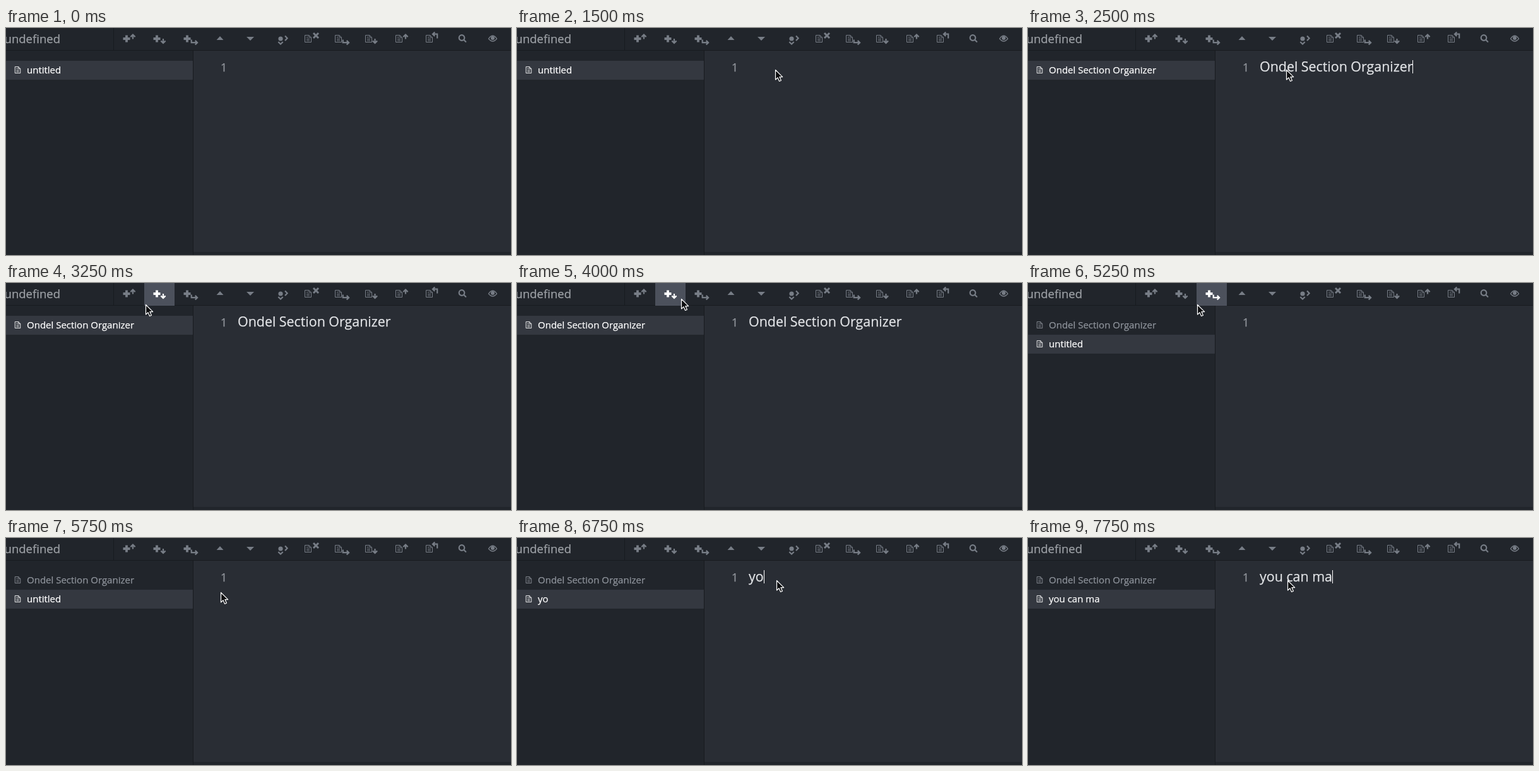
Write an HTML page that moves like this. It is 800x360 px and loops after 8 s.

```html
<!DOCTYPE html>
<html lang="en">
<head>
<meta charset="utf-8">
<title>Outline editor</title>
<style>
  html, body { margin: 0; width: 100%; height: 100%; overflow: hidden; background: #292d34; }
  svg { display: block; }
  text {
    font-family: "Open Sans", "Noto Sans", sans-serif; white-space: pre;
    fill: currentColor; stroke: currentColor; stroke-width: .25;
  }
  .button { color: #777d86; }
  .button rect { fill: none; }
  .button.hover { color: #fff; }
  .button.hover rect { fill: #4c515c; }
  .line { fill: none; stroke: currentColor; stroke-width: 2.2; }
  .bold { stroke-width: 3; }
  .row { color: #8e939b; font-size: 15px; }
  .row.selected { color: #fff; }
</style>
</head>
<body>
<svg width="800" height="360" viewBox="0 0 800 360">
  <defs>
    <path id="plus" d="M-5.5 0H5.5M0-5.5V5.5" fill="none" stroke="currentColor" stroke-width="3.8"/>
    <path id="up" class="line" d="M0 4V-2.5M-3.6 .6 0-3 3.6 .6"/>
    <path id="down" class="line" d="M0-4V2.5M-3.6-.6 0 3 3.6-.6"/>
    <path id="into" class="line" d="M-4.8-4V.7H4M1.2-2.6 4.6 .7 1.2 4"/>
    <path id="out" class="line" d="M3.7 5V-1.8H-3M-.2-5-3.6-1.8-.2 1.4"/>
    <path id="cross" class="line bold" d="M-4-4 4 4M4-4-4 4"/>
    <g id="file" fill="none" stroke="currentColor">
      <path d="M-5-5.5H1.5L5-2V5.5H-5ZM1.5-5.5V-2H5"/>
      <path d="M-2.5-2.5H0M-2.5 .5H2.5M-2.5 3H2.5"/>
    </g>
  </defs>

  <path fill="#292d34" d="M0 0H800V360H0Z"/>
  <path fill="#21252b" d="M0 0H800V36H0ZM0 36H296V360H0ZM297 355H800V360H297Z"/>
  <path fill="#181b1f" d="M0 35H800V36H0ZM170 0H171V35H170ZM296 36H297V360H296Z"/>
  <text x="86" y="24" text-anchor="end" font-size="18.5" color="#9da1a6">undefined</text>

  <g id="toolbar">
    <g><use href="#plus" x="-4" y="17"/><use href="#up" x="6" y="13.5"/></g>
    <g><use href="#plus" x="-4" y="17"/><use href="#down" x="6" y="21"/></g>
    <g><use href="#plus" x="-4" y="17"/><use href="#into" x="7.5" y="22.5"/></g>
    <g><path fill="currentColor" d="M-5.5 19 0 13 5.5 19Z"/></g>
    <g><path fill="currentColor" d="M-6 14H6L0 20Z"/></g>
    <g>
      <circle cy="17" r="3.6" fill="currentColor"/>
      <path class="line" d="M7 12.5 10.6 16.2 7 20M-3.7 22 0 25.5 3.7 22"/>
    </g>
    <g><use href="#file" x="-4.5" y="17"/><use href="#cross" x="8" y="12"/></g>
    <g><use href="#file" x="-4.5" y="17"/><use href="#into" x="7.5" y="22.5"/></g>
    <g><use href="#file" x="-4.5" y="17"/><use href="#down" x="5.5" y="21"/></g>
    <g><use href="#file" x="-4.5" y="17"/><use href="#up" x="6" y="13.5"/></g>
    <g><use href="#file" x="-4.5" y="17"/><use href="#out" x="4.5" y="11.5"/></g>
    <g><circle class="line" cx="-1" cy="15.5" r="4.3"/><path class="line" stroke-linecap="round" d="M2.2 18.7 5.3 21.8"/></g>
    <g>
      <path d="M-6.5 17Q0 7.5 6.5 17Q0 25 -6.5 17Z" fill="none" stroke="currentColor" stroke-width="1.3"/>
      <circle cy="16" r="3" fill="currentColor"/>
    </g>
  </g>

  <rect id="highlight" y="52" width="296" height="30" fill="#343840"/>
  <g class="row"><use href="#file" transform="translate(18.5 66.5) scale(.85 .92)"/><text x="33" y="72"></text></g>
  <g class="row"><use href="#file" transform="translate(18.5 96.5) scale(.85 .92)"/><text x="33" y="102"></text></g>

  <text x="345" y="69" text-anchor="middle" font-size="17.5" color="#92969c">1</text>
  <text id="editor" x="367" y="69" font-size="21.4" color="#e2e4e7"></text>
  <rect id="caret" y="51" width="1" height="21" fill="#fff"/>
  <path id="pointer" d="M.5 .5V16L4 12.7 6.6 18.5 9.4 17.3 6.9 11.6H11.7Z"
        fill="#0c0d0f" stroke="#fff" stroke-width="1.2" stroke-linejoin="round"/>
</svg>
<script>
  const LOOP = 8000, TICK = 250, PITCH = 48;
  const NAME = "Ondel Section Organizer";
  const SVG = "http://www.w3.org/2000/svg";
  const $ = id => document.getElementById(id);

  // Each entry is [time, value] and holds until the next one.
  const pointerTrack = [
    [0, null], [250, [517, 1]], [500, [452, 38]], [750, [423, 54]], [1000, [416, 58]],
    [1500, [409, 66]], [3000, [268, 52]], [3250, [221, 34]], [3500, [234, 27]],
    [3750, [250, 24]], [4000, [260, 25]], [4500, [257, 23]], [4750, [260, 25]],
    [5000, [264, 30]], [5250, [268, 34]], [5500, [291, 60]], [5750, [340, 86]],
    [6000, [386, 80]], [6250, [408, 70]], [6500, [411, 67]]
  ];
  const editorTrack = [
    [0, ""], [2250, NAME], [4250, ""], [6750, "yo"], [7000, "you"],
    [7250, "you c"], [7500, "you can"], [7750, "you can ma"]
  ];
  const titleTrack = [[0, "untitled"], [2500, NAME]];
  const caretTrack = [[0, false], [1750, true], [3000, false], [6500, true]];
  const at = (track, time) => track.findLast(([start]) => start <= time)[1];

  const buttons = [...$("toolbar").children];
  buttons.forEach((button, i) => {
    const back = document.createElementNS(SVG, "rect");
    back.setAttribute("x", -PITCH / 2);
    back.setAttribute("width", PITCH);
    back.setAttribute("height", 36);
    button.prepend(back);
    button.setAttribute("class", "button");
    button.setAttribute("transform", `translate(${195 + i * PITCH})`);
  });
  const rows = [...document.querySelectorAll(".row")];

  function draw(time) {
    const text = at(editorTrack, time);
    const added = time >= 4250;
    $("editor").textContent = text;
    rows[0].lastChild.textContent = at(titleTrack, time);
    rows[1].lastChild.textContent = text || "untitled";
    rows[0].classList.toggle("selected", !added);
    rows[1].classList.toggle("selected", added);
    rows[1].style.display = added ? "" : "none";
    $("highlight").setAttribute("y", added ? 82 : 52);

    const width = text ? $("editor").getComputedTextLength() : 0;
    $("caret").setAttribute("x", Math.round(367 + width));
    $("caret").style.display = at(caretTrack, time) ? "" : "none";

    const pos = at(pointerTrack, time);
    $("pointer").style.display = pos ? "" : "none";
    if (pos) $("pointer").setAttribute("transform", `translate(${pos})`);
    const hovered = pos && pos[1] < 36 && time >= 3000 ? Math.floor((pos[0] - 171) / PITCH) : -1;
    buttons.forEach((button, i) => button.classList.toggle("hover", i === hovered));
  }

  const start = performance.now();
  let shown = -1;
  function frame() {
    const time = Math.floor((performance.now() - start) % LOOP / TICK) * TICK;
    if (time !== shown) draw(shown = time);
    requestAnimationFrame(frame);
  }
  frame();
</script>
</body>
</html>
```
